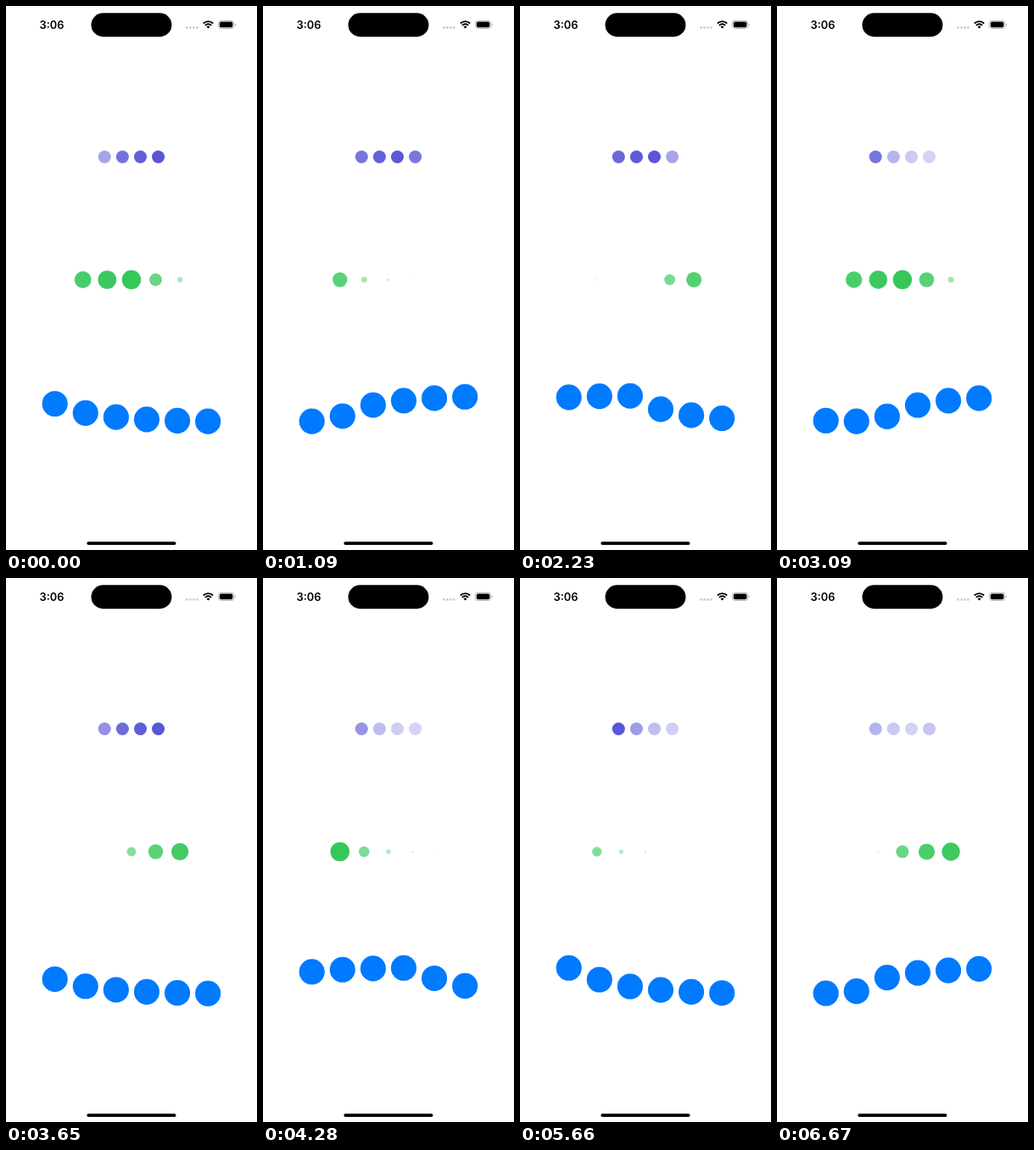
Animation of 296 by 640 pixels, one loop 6770 ms. Source, as an HTML page:

```html
<!DOCTYPE html>
<html lang="en">
<head>
<meta charset="utf-8">
<title>Dot loaders</title>
<style>
  html, body { margin: 0; width: 100%; height: 100%; overflow: hidden; background: #fff; }
  svg { display: block; width: 296px; height: 640px; }
  text { font: 600 12.8px Inter, "Liberation Sans", sans-serif; }
</style>
</head>
<body>
<svg id="stage" viewBox="0 0 296 640" xmlns="http://www.w3.org/2000/svg">
  <text x="54" y="26.5" text-anchor="middle">3:06</text>
  <rect x="100.5" y="8.3" width="94.9" height="27.9" rx="13.95"/>
  <path d="M213.4 25.4h12.1" stroke="#cbcbcd" stroke-width="2.8" stroke-linecap="round" stroke-dasharray="0 4"/>
  <g fill="none" stroke="#000" stroke-width="1.8">
    <path d="M232.8 20.5a8.1 8.1 0 0 1 11.4 0"/>
    <path d="M234.9 22.8a5 5 0 0 1 7.2 0"/>
  </g>
  <path d="M238.5 26.6l-2-2.1a2.9 2.9 0 0 1 4 0z"/>
  <rect x="250.4" y="17.3" width="18.4" height="9.2" rx="2.9" fill="none" stroke="#a6a6a6" stroke-width=".8"/>
  <rect x="251.8" y="18.6" width="15.6" height="6.6" rx="1.8"/>
  <path d="M269.9 20.4a1.7 1.7 0 0 1 0 3z" fill="#a6a6a6"/>
  <rect x="95.3" y="630.2" width="105.2" height="3.8" rx="1.9"/>
</svg>
<script>
const LOOP = 6770;
const BEAT = 154.4; // delay between neighbouring dots, ms
const START = 17.76; // beats already played when the loop begins
const svg = document.getElementById('stage');

// Steady clock with a slight sway over the loop.
const beatsAt = t => START + t / BEAT + 0.12 * Math.sin(Math.PI * t / LOOP);

const bezier = (s, a, b) => 3 * s * (1 - s) * (1 - s) * a + 3 * s * s * (1 - s) * b + s * s * s;

// cubic-bezier(0.6, 0, 0.98, 0.32)
function easeIn(u) {
  let lo = 0, hi = 1;
  for (let i = 0; i < 24; i++) {
    const mid = (lo + hi) / 2;
    if (bezier(mid, 0.6, 0.98) < u) lo = mid; else hi = mid;
  }
  return bezier(lo, 0, 0.32);
}

// Up and back between 0 and 1, accelerating on both ways.
function swing(h) {
  const p = h % 2;
  return p < 1 ? easeIn(p) : 1 - easeIn(p - 1);
}

// One swing of a row lasts as many beats as it has dots.
function makeRow({ count, gap, y, r, color, shift = 0, pose }) {
  const dots = Array.from({ length: count }, (_, i) => {
    const dot = document.createElementNS('http://www.w3.org/2000/svg', 'circle');
    const cx = 147.9 + (i - (count - 1) / 2) * gap;
    setAll(dot, { cx, cy: y, r, fill: color });
    return svg.appendChild(dot);
  });
  return beats => dots.forEach((dot, i) => setAll(dot, pose(swing((beats + shift - i) / count))));
}

function setAll(el, attrs) {
  for (const k in attrs) el.setAttribute(k, attrs[k]);
}

const rows = [
  makeRow({
    count: 4, gap: 21.1, y: 177.5, r: 7.55, color: '#5856d6', shift: -2,
    pose: v => ({ opacity: 0.25 + 0.75 * v })
  }),
  makeRow({
    count: 5, gap: 28.6, y: 322, r: 11.3, color: '#34c759',
    pose: v => ({ r: 11.3 * v, opacity: 0.2 + 0.8 * v })
  }),
  makeRow({
    count: 6, gap: 36.1, y: 488.8, r: 15.06, color: '#007aff',
    pose: v => ({ cy: 488.8 - 30.1 * v })
  })
];

function draw() {
  const beats = beatsAt(performance.now() % LOOP);
  rows.forEach(row => row(beats));
  requestAnimationFrame(draw);
}
draw();
</script>
</body>
</html>
```
